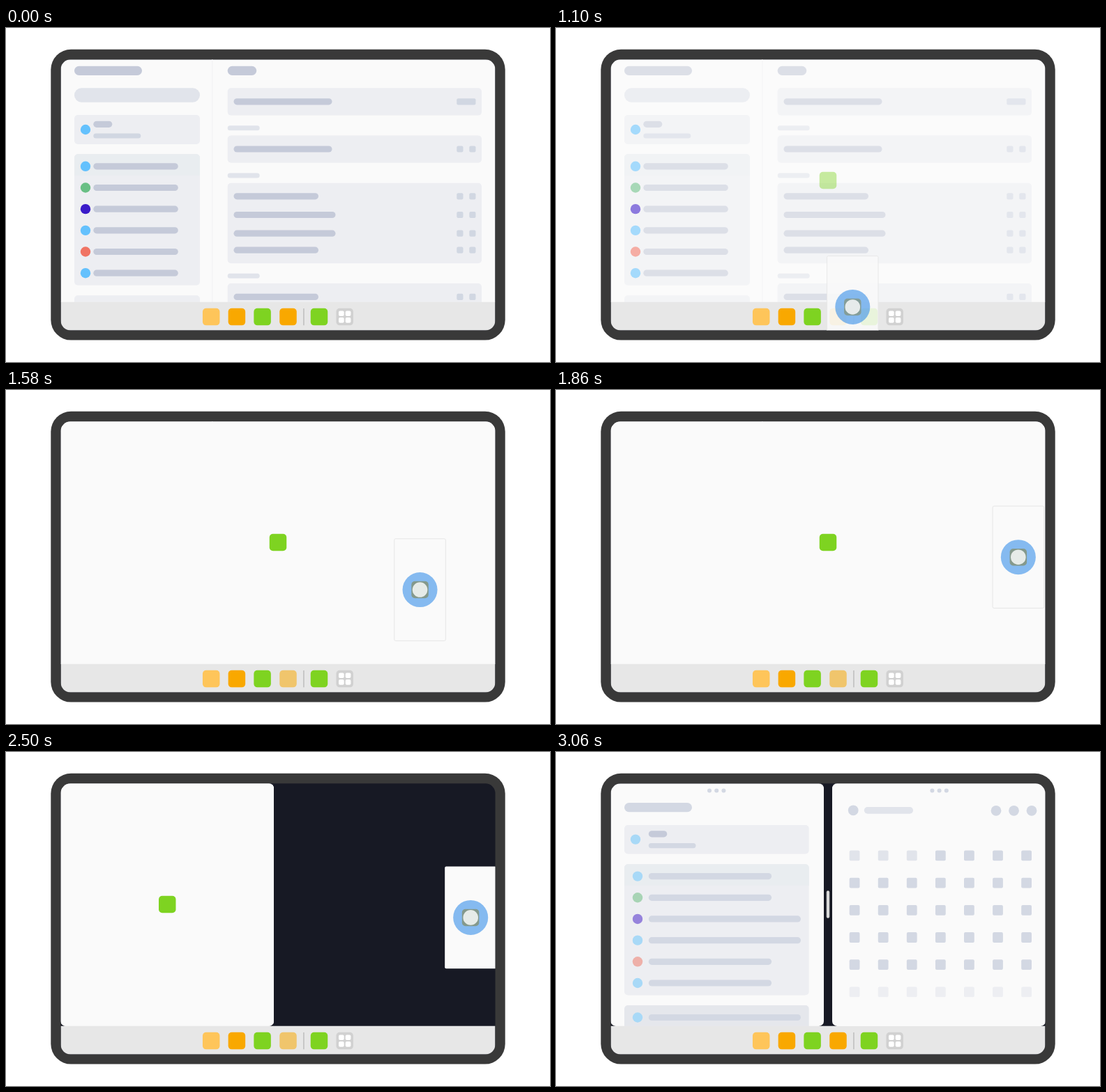
Recreate the animation shown at these times as an HTML page with a canvas. Size 780x480 px, loop 5.22 s.

```html
<!DOCTYPE html>
<html lang="en">
<head>
<meta charset="utf-8">
<title>Split screen</title>
<style>
html, body { margin: 0; width: 100%; height: 100%; overflow: hidden; background: #fff; }
canvas { display: block; }
</style>
</head>
<body>
<canvas id="stage" width="780" height="480"></canvas>
<script>
const ctx = document.getElementById('stage').getContext('2d');
const LOOP = 5220, START = 580, STEP = 40;
const PAPER = '#fafafa', CARD = '#edeef2', TINT = '#e9edf0', BAR = '#c5cad9',
  MID = '#d3d8e3', PALE = '#e1e4eb', ORANGE = '#f9a800', GREEN = '#7ed321';
const DOTS = ['#64c1fd', '#69bf85', '#3a1bc9', '#64c1fd', '#f07464', '#64c1fd'];
const SOFT_DOTS = ['#a8d9f7', '#a8d4b5', '#9683dc', '#a8d9f7', '#eeb0a9', '#a8d9f7'];

const lerp = (a, b, p) => a + (b - a) * p;
// Eased progress from 0 to 1 over a span of time.
function ease(t, start, length) {
  const u = Math.min(1, Math.max(0, (t - start) / length));
  return u * u * (3 - 2 * u);
}

function box(x, y, w, h, r, color, alpha = 1) {
  ctx.globalAlpha = alpha;
  ctx.fillStyle = color;
  ctx.beginPath();
  ctx.roundRect(x, y, w, h, r);
  ctx.fill();
  ctx.globalAlpha = 1;
}
const pill = (x, y, w, h, color) => box(x, y, w, h, h / 2, color);
const disc = (x, y, r, color, alpha) => box(x - r, y - r, 2 * r, 2 * r, r, color, alpha);
const appIcon = (x, y, color, alpha) => box(x - 12.25, y - 12.25, 24.5, 24.5, 5, color, alpha);

function clipTo(x, y, w, h, r, draw) {
  ctx.save();
  ctx.beginPath();
  ctx.roundRect(x, y, w, h, r);
  ctx.clip();
  draw();
  ctx.restore();
}

function moreDots(x, y) {
  for (const d of [-10.2, 0, 10.2]) disc(x + d, y, 3, MID);
}

function fullPage() {
  box(295, 45, 1.5, 350, 0, '#f3f3f5');
  pill(98, 54.7, 97, 13.3, BAR);
  pill(98, 86.3, 180, 20.5, PALE);
  box(98, 125, 180, 42, 5, CARD);
  disc(114, 146, 7.2, DOTS[0]);
  pill(125.3, 133.7, 27, 9.2, BAR);
  pill(125.3, 151.4, 68, 7.2, '#d1d7e2');
  box(98, 181.3, 180, 188.5, 5, CARD);
  box(98, 181.3, 180, 30.7, [5, 5, 0, 0], TINT);
  DOTS.forEach((color, i) => {
    const y = 198.8 + 30.68 * i;
    disc(114, y, 7.2, color);
    pill(125.3, y - 4.6, 121.5, 9.2, BAR);
  });
  box(98, 384.3, 180, 30, 5, CARD);

  pill(317.7, 54.7, 41.5, 13.3, BAR);
  for (const [y, h] of [[86.3, 39.3], [154.4, 39.3], [222.7, 115.5], [367, 50]])
    box(317.7, y, 364.3, h, 5, CARD);
  for (const y of [140.2, 208.4, 352.8]) pill(317.7, y, 46, 7, PALE);
  const rows = [[105.8, 141], [174, 141], [241.8, 121.5], [268.5, 146],
    [295.2, 146], [319.2, 121.5], [386.4, 121.5]];
  rows.forEach(([y, w], i) => {
    pill(326.5, y - 4.6, w, 9.2, BAR);
    if (i === 0) box(646.3, y - 4.6, 27.2, 9.2, 2, '#d1d7e2');
    else for (const x of [646.3, 664.3]) box(x, y - 4.6, 9.2, 9.2, 2, '#d1d7e2');
  });
}

function listPage() {
  moreDots(230.2, 55.6);
  pill(98, 73, 97, 13.3, MID);
  box(98, 105, 264.7, 41.5, 5, CARD);
  disc(114, 125.6, 7.2, SOFT_DOTS[0]);
  pill(132.8, 113.2, 26.5, 9.2, BAR);
  pill(132.8, 131, 67.7, 7.2, MID);
  box(98, 161.2, 264.7, 188.3, 5, CARD);
  box(98, 161.2, 264.7, 30.7, [5, 5, 0, 0], TINT);
  box(98, 364, 264.7, 50, 5, '#e5e7ec');
  [...SOFT_DOTS, SOFT_DOTS[0]].forEach((color, i) => {
    const y = i < 6 ? 178.6 + 30.68 * i : 381.5;
    const wide = i === 2 || i === 3 || i === 6;
    disc(117, y, 7.2, color);
    pill(132.8, y - 4.6, wide ? 218.2 : 176.3, 9.2, MID);
  });
}

function gridPage() {
  moreDots(549.6, 55.6);
  disc(426.2, 83.8, 7.4, MID);
  pill(441.8, 79, 70.3, 9.7, PALE);
  for (const x of [631, 656.5, 682]) disc(x, 84.3, 7.4, MID);
  for (let row = 0; row < 6; row++)
    for (let col = 0; col < 7; col++) {
      const color = row === 5 ? CARD : row === 0 && col < 3 ? PALE : MID;
      box(420.7 + 41.08 * col, 141.5 + 39.2 * row, 14.8, 14.8, 2, color);
    }
}

function dock(dim) {
  box(78.5, 393.8, 623, 41, 0, '#e7e7e7');
  appIcon(294.2, 415.1, '#fec55a');
  appIcon(330.9, 415.1, ORANGE);
  appIcon(367.6, 415.1, GREEN);
  appIcon(404.5, 415.1, ORANGE, 1 - 0.47 * dim);
  box(426.2, 403, 1.5, 24.3, 0, '#bdbdbd');
  appIcon(449, 415.1, GREEN);
  appIcon(485.7, 415.1, '#d1d1d1');
  for (const x of [477, 486.7])
    for (const y of [406.4, 416.1]) box(x, y, 7.7, 7.7, 2, '#fff');
}

function draw(t) {
  const press = ease(t, 560, 200);
  const leave = ease(t, 920, 400);
  const lift = Math.min(1, Math.max(0, (t - 927) / 200));
  const drag = ease(t, 927, 1000);
  const split = ease(t, 1927, 400);
  const open = ease(t, 2493, 400);
  const release = ease(t, 2493, 325);
  const reveal = ease(t, 2860, 200);

  box(0, 0, 780, 480, 0, '#fff');
  box(64.3, 30.8, 651.4, 417.8, 29, '#393939');

  clipTo(78.5, 45.3, 623, 389.2, 14, () => {
    box(78, 45, 624, 390, 0, '#171924');

    const width = lerp(623, 305.5, split);
    clipTo(78.5, 45.3, width, 348.6, 7 * split, () => {
      box(78, 45, 624, 349, 0, PAPER);
      if (t < 1927) fullPage();
      else if (reveal) listPage();
      box(78, 45, 624, 349, 0, PAPER, t < 1927 ? leave : 1 - reveal);
      appIcon(78.5 + width / 2, 219, GREEN, leave * (1 - reveal));
    });
    box(387.8, 199.3, 4.4, 39.5, 2.2, '#d9d9d9', reveal);
    dock(lift * (1 - reveal));

    if (!lift) return;
    const cx = lerp(lerp(404.5, 666.2, drag), 549, open);
    const cy = lerp(lerp(415, 237.9, drag), 219.5, open);
    const w = lerp(73.6, 306, open), h = lerp(146.6, 348.8, open);
    const x = cx - w / 2, y = cy - h / 2, r = lerp(2, 7, open);
    box(x, y, w, h, r, PAPER, lift);
    if (!split) {
      ctx.globalAlpha = lift;
      ctx.strokeStyle = '#e6e6e6';
      ctx.lineWidth = 1;
      ctx.stroke();
      ctx.globalAlpha = 1;
    }
    if (reveal) {
      clipTo(x, y, w, h, r, () => {
        gridPage();
        box(x, y, w, h, 0, PAPER, 1 - reveal);
      });
    }
    appIcon(cx, cy, ORANGE, lift * (1 - reveal));
  });

  const shown = press * (1 - release);
  if (shown) {
    const x = lerp(404.5, 666.2, drag), y = lerp(415, 237.9, drag);
    const scale = lerp(0.5, 1, press) + 0.5 * release;
    disc(x, y, 25 * scale, '#378fe9', 0.6 * shown);
    disc(x, y, 10.8 * scale, '#fff', 0.8 * shown);
  }
}

function tick() {
  const t = performance.now() % LOOP;
  draw(t < START ? 0 : START + Math.floor((t - START) / STEP) * STEP);
  requestAnimationFrame(tick);
}
tick();
</script>
</body>
</html>
```
